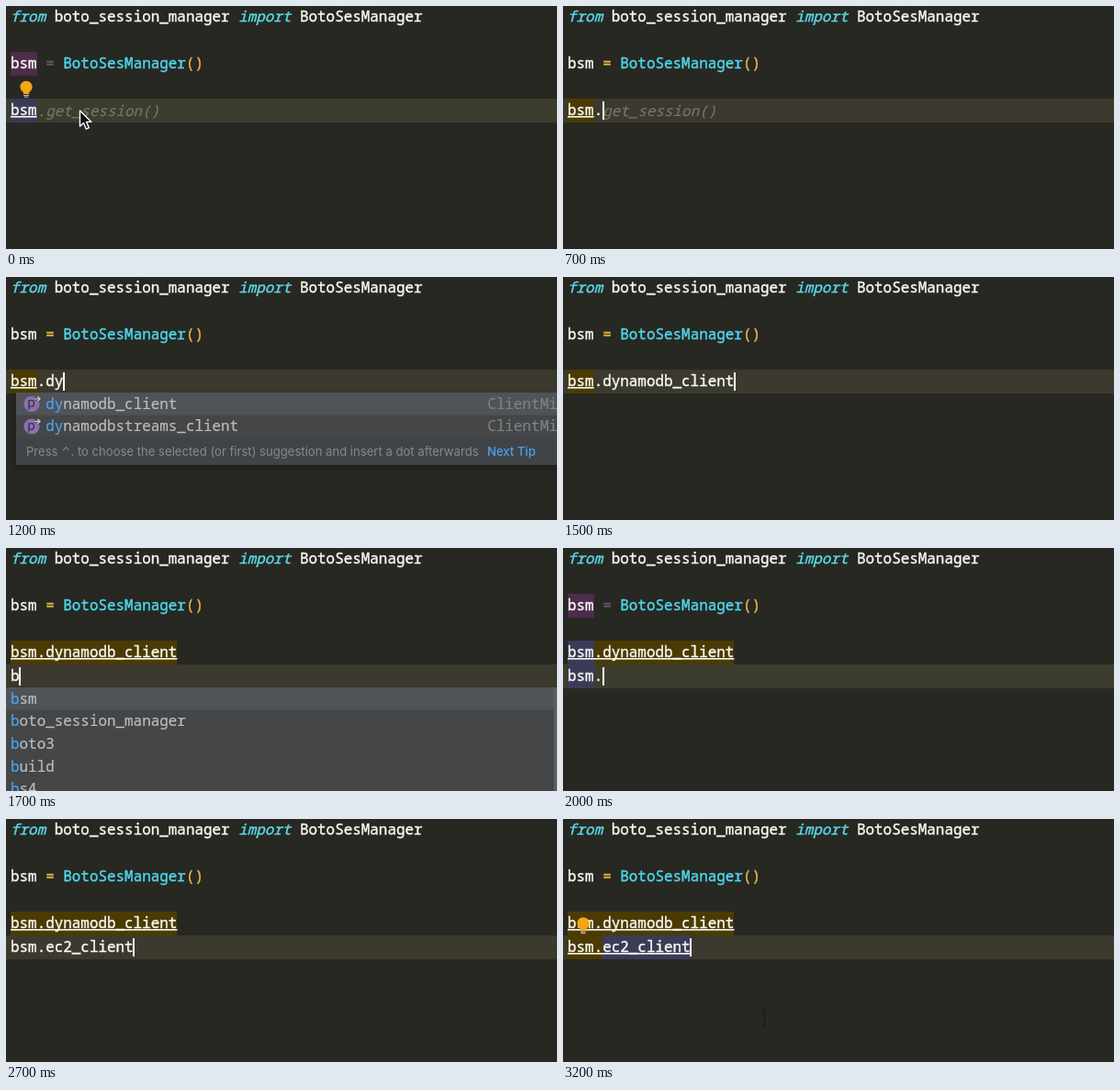
Write an HTML page that moves like this. It is 600 px wide and 265 px high and loops after 3300 ms.

```html
<!DOCTYPE html>
<html lang="en">
<head>
<meta charset="utf-8">
<title>Code completion</title>
<style>
  html, body { margin: 0; width: 100%; height: 100%; overflow: hidden; background: #272822; }
  svg { display: block; width: 600px; height: 265px; }
  text { white-space: pre; }
  .code { font: 15.92px "Noto Sans Mono", "DejaVu Sans Mono", monospace; color: #f8f8f2; stroke-width: .4; }
  .code, .code tspan { fill: currentColor; stroke: currentColor; }
  .ui { font: 13.1px Inter, "Open Sans", sans-serif; }
  .tip { font-weight: 500; }
  .key { font-style: italic; color: #5bd8ea; }
  .type { color: #4fd6ec; }
  .paren { color: #e6b54c; }
  .equals { color: #e3b443; }
  .dim { color: #69566a; }
  .ghost { font-style: italic; color: #76766b; stroke-width: .15; }
  .item { color: #bbbdbf; stroke-width: .2; }
  .match { color: #4ba4ee; }
  .owner { color: #7f8385; stroke-width: .15; }
  .popup { filter: drop-shadow(0 4px 4px rgba(0, 0, 0, .25)); }
</style>
</head>
<body>
<svg id="stage" viewBox="0 0 600 265" xmlns="http://www.w3.org/2000/svg"></svg>
<script>
const LOOP = 3300, LEFT = 5, CHAR = 9.552, PITCH = 25.65, ROW = 24.6, BAND = 26;
const BROWN = '#4b3b02', BLUE = '#3b3b59', PURPLE = '#4e2c4b';
const stage = document.getElementById('stage');

const col = n => LEFT + n * CHAR;
const lineTop = line => Math.round(-1.5 + (line - 1) * PITCH);
const base = line => 16.6 + (line - 1) * PITCH;
const rect = (x, y, w, h, fill) =>
  `<rect x="${x}" y="${y}" width="${w}" height="${h}" fill="${fill}"/>`;
const text = (x, y, body, cls = '') => `<text class="code ${cls}" x="${x}" y="${y}">${body}</text>`;
const span = (cls, s) => `<tspan class="${cls}">${s}</tspan>`;
const mark = (line, from, len, fill) =>
  rect(Math.round(col(from)), lineTop(line), Math.round(len * CHAR), BAND, fill);
const under = (line, from, len) =>
  rect(col(from), Math.round(base(line)) + 1, len * CHAR, 1.6, '#f8f8f2');

const clients = names => names.split(' ').map(n => n + '_client');
const all = clients('accessanalyzer account acm acm_pca amp');
const withD = clients('dynamodb dynamodbstreams docdb dax dms');
const withDy = clients('dynamodb dynamodbstreams');
const withE = clients('ec2 es ebs ecr ecs');
const withEc = clients('ec2 ecr ecs ecr_public ec2_instance_connect');
const words = ['bsm', 'boto_session_manager', 'boto3', 'build', 'bs4'];

// Each step changes the listed fields; marks are [line, column, length, colour].
const FULL = 'bsm.dynamodb_client';
const bsmWarn = [[5, 0, 3, BROWN]];
const lineWarn = [[5, 0, 19, BROWN]];
const steps = [
  [0, { a: 'bsm', b: null, ghost: '.get_session()', ghostAt: 3, lit: true,
        marks: [[5, 0, 3, BLUE]], lines: [[5, 0, 3]], lamp: 90, mouse: true,
        caret: false, list: null, beam: false }],
  [300, { caret: true }],
  [600, { a: 'bsm.', ghost: 'get_session()', ghostAt: 4, lit: false,
          marks: bsmWarn, lamp: 0, mouse: false }],
  [800, { ghost: '', list: all }],
  [1000, { a: 'bsm.d', list: withD }],
  [1100, { a: 'bsm.dy', list: withDy }],
  [1400, { a: FULL, list: null }],
  [1600, { b: '', marks: lineWarn, lines: [[5, 0, 19]] }],
  [1700, { b: 'b', list: words }],
  [1800, { b: 'bs', list: ['bsm', 'bs4'] }],
  [1900, { b: 'bsm', list: null }],
  [2000, { b: 'bsm.', lit: true,
           marks: [...lineWarn, [5, 0, 3, BLUE], [6, 0, 3, BLUE]] }],
  [2100, { lit: false, marks: lineWarn, list: all }],
  [2300, { b: 'bsm.e', list: withE }],
  [2400, { b: 'bsm.ec', list: withEc }],
  [2500, { b: 'bsm.ec2', list: clients('ec2 ec2_instance_connect') }],
  [2700, { b: 'bsm.ec2_client', list: null }],
  [2900, { marks: [...lineWarn, [6, 0, 4, BROWN], [6, 4, 10, BLUE]],
           lines: [[5, 0, 19], [6, 0, 14]] }],
  [3100, { lamp: 115.5, beam: true }]
];

function icon(y) {
  const badge = (color, width) => `<path d="M30.5 ${y - 5.5}h6.5m-2.6-2.6l2.6 2.6l-2.6 2.6"
    fill="none" stroke="${color}" stroke-width="${width}"/>`;
  return `<circle cx="28" cy="${y}" r="8.6" fill="#8b70ad"/>` +
    `<text x="27.5" y="${y + 4}" text-anchor="middle" font-family="Inter, sans-serif"
      font-size="14" fill="#332b40">p</text>` +
    badge('#45484a', 3.6) + badge('#c3c6c8', 1.4);
}

function popup(s) {
  const line = s.b === null ? 5 : 6;
  const typed = line === 5 ? s.a : s.b;
  const member = typed.includes('.');
  const prefix = member ? typed.split('.')[1] : typed;
  const x = member ? 11 : 0;
  const y = line === 5 ? 126 : 152;
  const rows = s.list.length;
  const short = rows < 5;
  const h = rows * ROW + (short ? 29.5 : 0);
  let out = rect(x, y, 600 - x, h, '#444648') + rect(x, y, 600 - x, ROW, '#505357');
  s.list.forEach((name, i) => {
    const mid = y + 12.4 + i * ROW;
    if (member) out += icon(mid) + text(col(54.35), mid + 5.4, 'ClientMixin', 'owner');
    out += text(member ? 43.2 : LEFT, mid + 5.4,
      span('match', name.slice(0, prefix.length)) + name.slice(prefix.length), 'item');
  });
  if (short) {
    const ty = y + rows * ROW + 19.8;
    out += rect(x, y + rows * ROW, 600 - x, 29.5, '#414446') +
      `<text class="ui" x="22" y="${ty}" fill="#85898b">Press \u2303. to choose the selected (or first) suggestion and insert a dot afterwards</text>` +
      `<text class="ui tip" x="524" y="${ty}" fill="#4a9ff0">Next Tip</text>`;
  } else if (!member) {
    out += rect(596.5, y, 3.5, h, '#5c5e60');
  }
  return `<g class="popup">${out}</g>`;
}

function bulb(y) {
  return `<path d="M18.8 ${y + 4}a6.6 6.6 0 1 1 6.4 0v2h-6.4z" fill="#f4a712"/>` +
    rect(19, y + 6.9, 6, 1.2, '#b9b9b4') + rect(19.7, y + 8.6, 4.6, 1.1, '#b9b9b4');
}

const arrow = `<path d="M80.5 114v17.2l4-3.7l2.7 6.6l3.1-1.3l-2.8-6.4h5.4z"
  fill="#111" stroke="#fff" stroke-width="1.4" stroke-linejoin="round"/>`;
const beam = `<path d="M217 207q2.5 0 2.5 2.5v14q0 2.5-2.5 2.5m5-19q-2.5 0-2.5 2.5m0 14q0 2.5 2.5 2.5"
  fill="none" stroke="#1b1c18" stroke-width="1.2"/>`;

function draw(s) {
  const line = s.b === null ? 5 : 6;
  const typed = line === 5 ? s.a : s.b;
  let out = rect(0, 0, 600, 265, '#272822') +
    rect(0, lineTop(line), 600, BAND, s.lit ? '#3d3d2f' : '#3c392e');
  if (s.lit) out += mark(3, 0, 3, PURPLE);
  out += s.marks.map(m => mark(...m)).join('');
  out += text(LEFT, base(1), span('key', 'from') + ' boto_session_manager ' +
    span('key', 'import') + ' BotoSesManager');
  out += text(LEFT, base(3), `bsm ${span(s.lit ? 'dim' : 'equals', '=')} ` +
    span('type', 'BotoSesManager') + span('paren', '()'));
  out += text(LEFT, base(5), s.a);
  if (s.b) out += text(LEFT, base(6), s.b);
  if (s.ghost) out += text(col(s.ghostAt), base(5) + .6, s.ghost, 'ghost');
  out += s.lines.map(l => under(...l)).join('');
  if (s.caret) out += rect(Math.round(col(typed.length) - .6), lineTop(line) + 3, 2, 20, '#fff');
  if (s.list) out += popup(s);
  if (s.lamp) out += bulb(s.lamp);
  if (s.mouse) out += arrow;
  if (s.beam) out += beam;
  stage.innerHTML = out;
}

let shown = -1;
const start = performance.now();
function tick() {
  const t = (performance.now() - start) % LOOP;
  const now = steps.filter(([at]) => at <= t);
  if (now.length !== shown) {
    shown = now.length;
    draw(Object.assign({}, ...now.map(([, change]) => change)));
  }
  requestAnimationFrame(tick);
}
tick();
</script>
</body>
</html>
```
